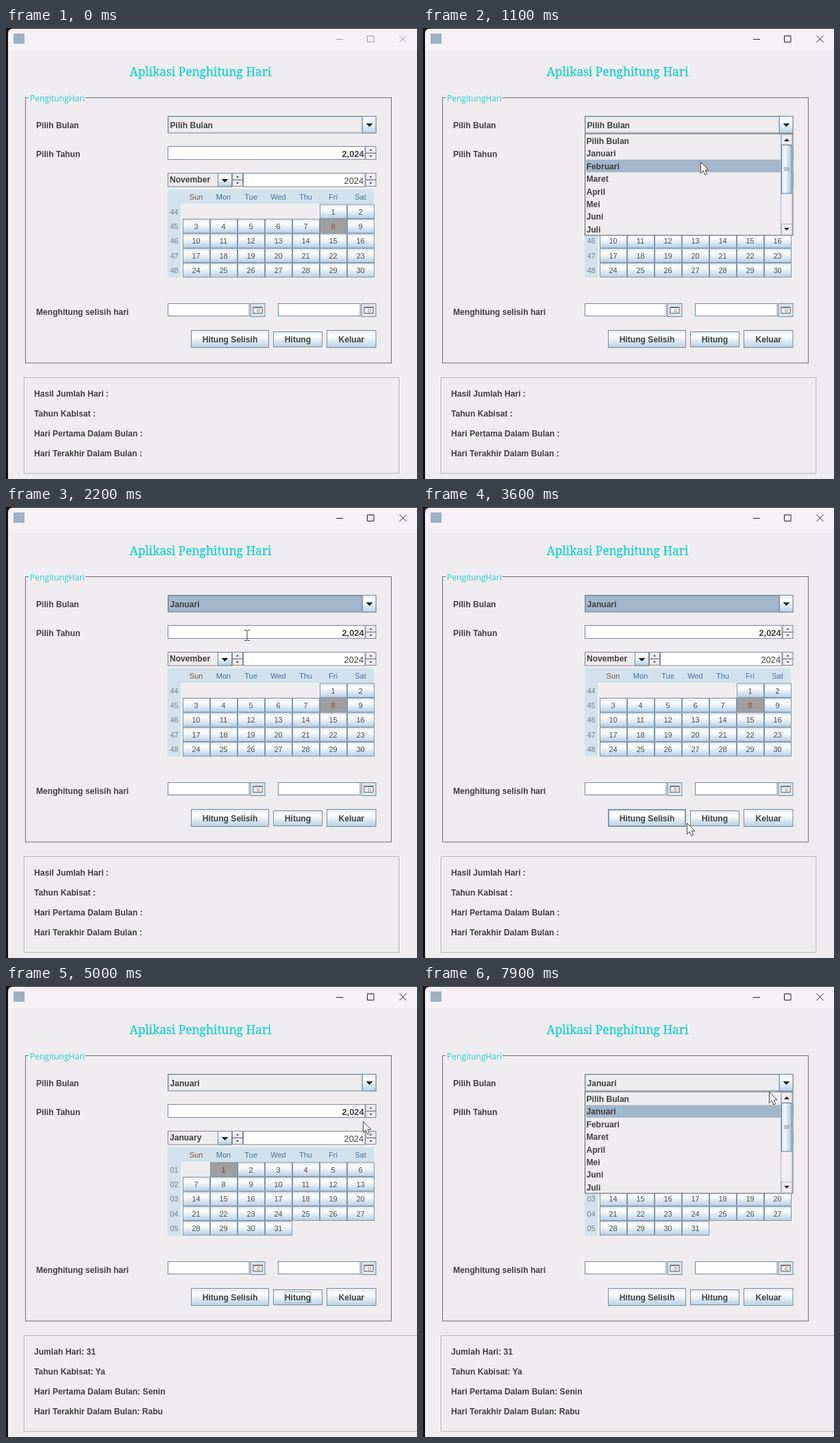
Write an HTML page that moves like this. It is 600 by 657 pixels and loops after 8 s.

```html
<!DOCTYPE html>
<html lang="id">
<head>
<meta charset="utf-8">
<style>
html, body { margin: 0; width: 100%; height: 100%; overflow: hidden; background: #eeecee; }
svg { display: block; width: 600px; height: 657px; }
text { font: 12.1px "Liberation Sans", Arial, sans-serif; fill: #404040; white-space: pre; }
.b { font-weight: bold; }
.title { font: 17.3px "Noto Serif", serif; fill: #1bcfd1; stroke: #1bcfd1; stroke-width: .3px; text-anchor: middle; }
.legend { font: 12px "Open Sans", sans-serif; fill: #2bcfd6; }
</style>
</head>
<body>
<svg viewBox="0 0 600 657">
  <defs>
    <linearGradient id="metal" x2="0" y2="1">
      <stop stop-color="#dde8f3"/><stop offset=".3" stop-color="#fff"/><stop offset="1" stop-color="#b8cfe5"/>
    </linearGradient>
    <linearGradient id="thumb">
      <stop stop-color="#d5e3f1"/><stop offset=".3" stop-color="#f4f8fc"/><stop offset="1" stop-color="#b0c9e2"/>
    </linearGradient>
  </defs>
  <g id="view"></g>
</svg>
<script>
const LOOP = 8000, STEP = 100;
const OPEN1 = 600, PICK = 1500, COUNT = 4100, OPEN2 = 7400;
const BG = '#eeecee', EDGE = '#7a8a99', METAL = 'url(#metal)', PICKED = '#a3b8cc';
const ITEMS = ['Pilih Bulan', 'Januari', 'Februari', 'Maret', 'April', 'Mei', 'Juni', 'Juli'];
const DAYS = ['Sun', 'Mon', 'Tue', 'Wed', 'Thu', 'Fri', 'Sat'];
const view = document.getElementById('view');

// Pointer path: time, x, y
const PATH = [
  [200, 470, 290], [500, 528, 142], [700, 526, 144], [1100, 405, 195], [1400, 372, 183],
  [1600, 364, 184], [2200, 352, 187], [2700, 356, 198], [3200, 380, 400], [3600, 385, 460],
  [4000, 424, 456], [4300, 428, 453], [5000, 521, 197], [5400, 538, 180], [6300, 539, 178],
  [6600, 539, 177], [7200, 531, 143], [7500, 528, 143], [7900, 505, 154]
];
const FIELDS = [[237, 172, 523, 192], [347, 212, 523, 231], [237, 401, 355, 420], [397, 401, 517, 420]];
const within = (p, [l, t, r, b]) => p.x >= l && p.x <= r && p.y >= t && p.y <= b;

const box = (l, t, r, b, fill, stroke = 'none') =>
  `<rect x="${l}" y="${t}" width="${r - l}" height="${b - t}" fill="${fill}" stroke="${stroke}"/>`;
const path = (d, stroke, fill = 'none') => `<path d="${d}" stroke="${stroke}" fill="${fill}"/>`;
const text = (s, x, y, style = '', cls = '') => `<text x="${x}" y="${y}" class="${cls}" style="${style}">${s}</text>`;
const bold = (s, x, y, style) => text(s, x, y, style, 'b');
const mid = 'text-anchor:middle;', end = 'text-anchor:end;';
const arrow = (x, y, h = 5, w = 5) => path(`M${x - w} ${y}h${2 * w}l${-w} ${h}z`, 'none', '#222');

function spinner(x, y, hot) {
  return box(x, y, x + 15, y + 9.5, hot ? '#b8cfe5' : BG, EDGE) + box(x, y + 10, x + 15, y + 19, BG, EDGE) +
    arrow(x + 7.5, y + 6, -2, 2) + arrow(x + 7.5, y + 13.5, 2, 2);
}

function dateField(l, r) {
  return box(l, 401.5, r, 419.5, '#fff', EDGE) + box(r + 2, 401.5, r + 23, 420.5, '#dbe4ec', EDGE) +
    box(r + 6, 406.5, r + 19, 415.5, '#f4f1ee', '#666') + box(r + 6, 406, r + 19, 408, '#777') +
    `<circle cx="${r + 13.5}" cy="411.8" r="2" fill="none" stroke="#a58a78"/>`;
}

function button(label, l, t, r, b, hot, focus) {
  const cx = (l + r) / 2;
  return box(l, t, r, b, METAL, EDGE) +
    (hot ? box(l + 1, t + 1, r - 1, b - 1, 'none', '#8ba5c0') : '') +
    (focus ? box(cx - 19, 445.5, cx + 19, 461.5, 'none', '#9fb3c8') : '') +
    bold(label, cx, 458, mid);
}

function titleBar(active) {
  const c = active ? '#222' : '#999';
  return box(0, 0, 600, 657, BG) + box(0, 0, 600, 32, '#f6f1f5') +
    path('M0 0H600V1H10Q3 1 3 8V657H0Z', 'none', '#111') +
    box(11, 8, 27, 23, '#9db1c5') +
    path('M482 16.5h10M527.5 11.5h9.5v9h-9.5zM574.5 11l10 10M584.5 11l-10 10', c);
}

function monthCombo(label, focused) {
  return box(236.5, 128.5, 540, 153, focused ? PICKED : BG, EDGE) +
    box(237.5, 129.5, 519, 152, 'none', focused ? '#8ba0b8' : '#b3c6d9') +
    box(520.5, 128.5, 540, 153, METAL, EDGE) + arrow(530.5, 139) + bold(label, 239.5, 145.5);
}

function calendar(january) {
  const [name, week, first, count, picked] = january ? ['January', 1, 1, 31, 1] : ['November', 44, 5, 30, 8];
  let s = box(236.5, 211.5, 329.5, 231, BG, EDGE) + box(309.5, 211.5, 329.5, 231, METAL, EDGE) +
    arrow(319.5, 220) + bold(name, 239, 225) + spinner(330.5, 211.5) +
    box(346.5, 211.5, 524, 231, '#fff', EDGE) + text('2024', 522, 226.5, end + 'font-size:12.8px') +
    spinner(525, 211.5) + box(236, 235, 537, 256, '#d2e2ec') + box(236, 235, 255, 363.5, '#d2e2ec');
  DAYS.forEach((d, i) => s += text(d, 277.5 + 40 * i, 250, mid + `font-size:11px;fill:${i ? '#4470a0' : '#8c4f3c'}`));
  for (let r = 0; r < 5; r++)
    s += text(String(week + r).padStart(2, '0'), 245.5, 271.5 + 21.4 * r, mid + 'font-size:11px;fill:#75808a');
  for (let d = 1; d <= count; d++) {
    const n = d + first - 1, x = 258.5 + n % 7 * 40, y = 257 + Math.floor(n / 7) * 21.4;
    const ink = d === picked && !january ? '#8c5040' : '#4c4c4c';
    s += box(x, y, x + 39, y + 20.4, d === picked ? '#a09e9f' : METAL, '#8394a5') +
      text(d, x + 19, y + 14.5, mid + `font-size:11px;fill:${ink}`);
  }
  return s;
}

function popup(row) {
  let s = box(236.5, 154, 540, 302, BG, '#5c6066') + box(238, 155 + 18.4 * row, 522, 173.4 + 18.4 * row, '#a3b6ca');
  ITEMS.forEach((item, i) => s += bold(item, 238.5, 169 + 18.4 * i));
  return s + box(522.5, 155, 539, 301, BG, '#a9b3bd') +
    box(523.5, 155.5, 538.5, 170, BG, '#b5bec8') + arrow(531, 165, -4, 4) +
    box(523.5, 285.5, 538.5, 301, BG, '#b5bec8') + arrow(531, 291, 4, 4) +
    box(523.5, 170.5, 538, 241, 'url(#thumb)', '#6382a8') + path('M527 203.5h8M527 205.5h8M527 207.5h8', '#7f98b5');
}

function results(done) {
  const lines = done
    ? ['Jumlah Hari: 31', 'Tahun Kabisat: Ya', 'Hari Pertama Dalam Bulan: Senin', 'Hari Terakhir Dalam Bulan: Rabu']
    : ['Hasil Jumlah Hari :', 'Tahun Kabisat :', 'Hari Pertama Dalam Bulan :', 'Hari Terakhir Dalam Bulan :'];
  const right = done ? 620 : 574;
  return box(27.5, 510.5, right + 1, 650, 'none', '#fff') + box(26.5, 509.5, right, 649, 'none', '#acabad') +
    lines.map((line, i) => bold(line, 41, 537 + 29 * i)).join('');
}

function pointerAt(t) {
  const i = PATH.findIndex(k => k[0] > t);
  if (i === 0) return null;
  const [t0, x0, y0] = PATH.at(i < 0 ? -1 : i - 1), [t1, x1, y1] = i < 0 ? [t0 + 1, x0, y0] : PATH[i];
  let u = Math.min(1, (t - t0) / (t1 - t0));
  u = u * u * (3 - 2 * u);
  return { x: x0 + (x1 - x0) * u, y: y0 + (y1 - y0) * u };
}

function pointer(p, open) {
  const beam = !open && FIELDS.some(f => within(p, f));
  return `<g transform="translate(${p.x} ${p.y})">` + (beam
    ? path('M-4 -7.5h3.5M.5 -7.5h3.5M0 -7v14M-4 7.5h3.5M.5 7.5h3.5', '#444')
    : path('M.5 .5V16.5L4.2 13 6.8 19 9.5 17.8 7 12H12Z', '#444', '#fff')) + '</g>';
}

function draw(t) {
  const p = pointerAt(t), off = { x: -9, y: -9 }, at = p || off;
  const open = t >= OPEN1 && t < PICK || t >= OPEN2, done = t >= COUNT;
  const month = t < PICK ? ITEMS[0] : ITEMS[1];
  const row = at.y >= 155 ? Math.floor((at.y - 155) / 18.4) : t < PICK ? 0 : 1;
  const hover = (...area) => !open && within(at, area);
  view.innerHTML = titleBar(t >= 300) +
    text('Aplikasi Penghitung Hari', 284, 70, '', 'title') +
    box(28.5, 101.5, 562.5, 488, 'none', '#6e6d6f') + box(33, 99, 116, 104, BG) +
    text('PengitungHari', 35, 107, '', 'legend') +
    bold('Pilih Bulan', 44, 145.5) + bold('Pilih Tahun', 44, 187.5) + bold('Menghitung selisih hari', 44, 418) +
    monthCombo(month, t >= PICK && !done) +
    box(236.5, 172.5, 524, 191.5, '#fff', EDGE) + bold('2,024', 522.5, 187.5, end + 'font-size:12.8px') +
    spinner(525, 172.5, hover(525, 172, 540, 182)) +
    calendar(done) + dateField(236.5, 355) + dateField(397.5, 517) +
    button('Hitung Selisih', 270.5, 440.5, 383.5, 465.5, hover(270, 440, 385, 466)) +
    button('Hitung', 390.5, 442.5, 461.5, 464.5, hover(390, 442, 462, 465), done && t < OPEN2) +
    button('Keluar', 468.5, 440.5, 540, 465.5, hover(468, 440, 540, 466)) +
    results(done) + (open ? popup(row) : '') + (p ? pointer(p, open) : '');
}

let last = -1;
function tick() {
  const t = Math.floor(performance.now() % LOOP / STEP) * STEP;
  if (t !== last) draw(last = t);
  requestAnimationFrame(tick);
}
tick();
</script>
</body>
</html>
```
